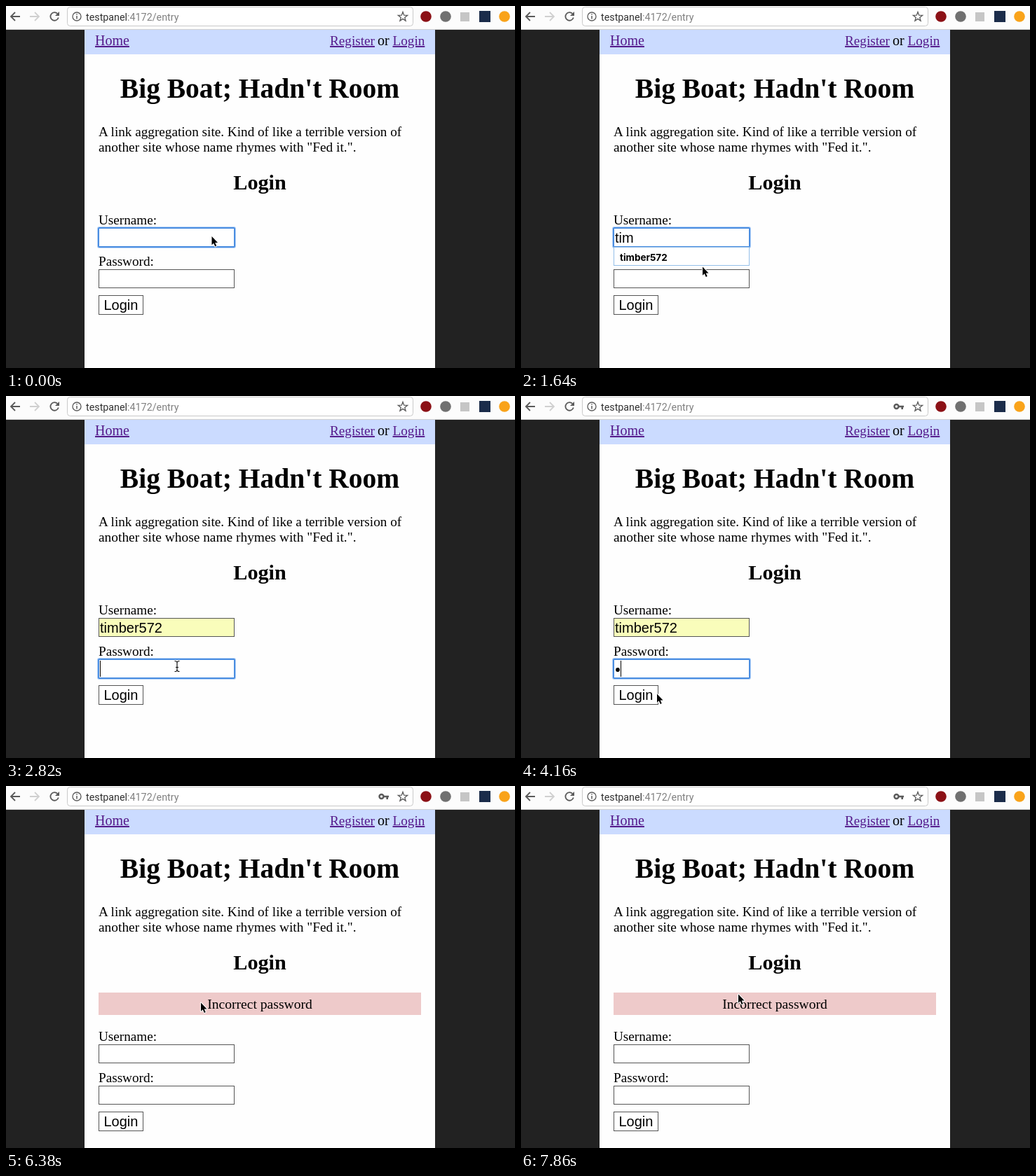
Animation, 726 px wide and 517 px high, one loop 8 s. Source, as an HTML page:

```html
<!DOCTYPE html>
<html lang="en">
<head>
<meta charset="utf-8">
<title>Login form</title>
<style>
  html, body { margin: 0; width: 100%; height: 100%; overflow: hidden; background: #222; }
  svg { display: block; }
  .serif { font: 19.2px "Liberation Serif", serif; }
  .field { font: 20px "Liberation Sans", sans-serif; }
  .link { fill: #551a8b; text-decoration: underline; }
  .bold { font-weight: bold; text-anchor: middle; }
  .box { fill: #fff; stroke: #555; }
  .icon { fill: none; stroke: #5a5a5a; stroke-width: 1.8; }
</style>
</head>
<body>
<svg width="726" height="517" viewBox="0 0 726 517">
  <rect width="726" height="517" fill="#222"/>
  <rect x="112" y="34" width="500" height="483" fill="#fefefe"/>
  <rect x="112" y="34" width="500" height="35" fill="#cbdbff"/>

  <!-- browser toolbar -->
  <rect width="726" height="34" fill="#fcfcfc"/>
  <path d="M0 33.5H726" stroke="#d0d0d0"/>
  <rect x="87.5" y="1.5" width="493" height="27" rx="4" fill="#fff" stroke="#c9c9c9"/>
  <path class="icon" d="M20 15H7.5M13 9L7 15L13 21"/>
  <path class="icon" d="M34 15H46.5M41 9L47 15L41 21" style="stroke:#d0d0d0"/>
  <g id="reload">
    <path class="icon" d="M73.5 11A5.8 5.8 0 1 0 74.8 16.5"/>
    <path d="M76 8V14H70Z" fill="#5a5a5a"/>
  </g>
  <path id="stop" class="icon" d="M64 10L74 20M74 10L64 20"/>
  <circle class="icon" cx="101" cy="15" r="6" style="stroke-width:1.3"/>
  <path d="M101 14V18.5M101 11V12.6" stroke="#5a5a5a" stroke-width="1.5"/>
  <text x="114" y="20.5" font-family="Roboto, sans-serif" font-size="14.3" fill="#303030">testpanel<tspan fill="#808080">:4172/entry</tspan></text>
  <g id="key">
    <circle class="icon" cx="535.5" cy="15" r="3" style="stroke-width:2.4"/>
    <path d="M538 15H546M543.7 15V19" fill="none" stroke="#5a5a5a" stroke-width="2.6"/>
  </g>
  <path id="star" class="icon" style="stroke-width:1.3"/>
  <circle cx="599" cy="15" r="7.8" fill="#8b1015"/>
  <circle cx="627" cy="15" r="7.8" fill="#707070"/>
  <rect x="648" y="9" width="13" height="13" fill="#c6c6c6"/>
  <rect x="675" y="7" width="16" height="16" fill="#1b2c4a"/>
  <circle cx="711" cy="15" r="7.8" fill="#f9a31a"/>

  <!-- page -->
  <g class="serif">
    <text class="link" x="127" y="56" style="font-size:20px">Home</text>
    <text class="link" x="462" y="56">Register</text>
    <text x="530" y="56" style="font-size:20px">or</text>
    <text class="link" x="551.5" y="56">Login</text>
    <text class="bold" x="362" y="131" style="font-size:39.5px">Big Boat; Hadn't Room</text>
    <text x="132" y="186">A link aggregation site. Kind of like a terrible version of</text>
    <text x="132" y="208" style="font-size:19.4px">another site whose name rhymes with "Fed it.".</text>
    <text class="bold" x="362" y="262" style="font-size:30.2px">Login</text>
    <g id="error">
      <rect x="132" y="295" width="460" height="32" fill="#eecaca"/>
      <text x="362" y="317.5" text-anchor="middle" style="font-size:19.6px">Incorrect password</text>
    </g>
  </g>

  <g id="form">
    <text class="serif" x="132" y="312">Username:</text>
    <text class="serif" x="132" y="371">Password:</text>
    <rect id="userBox" class="box" x="132.5" y="317.5" width="193" height="26"/>
    <rect class="box" x="132.5" y="376.5" width="193" height="26"/>
    <g id="ring" fill="none">
      <rect x="131" y="316" width="196" height="29" rx="2" stroke="#b5d3f8" stroke-width="2"/>
      <rect x="132" y="317" width="194" height="27" rx="1" stroke="#4a8de0" stroke-width="2"/>
    </g>
    <text id="user" class="field" x="134" y="338"></text>
    <circle id="bullet" cx="138" cy="391" r="2.9"/>
    <path id="caret" d="M0 378V401" stroke="#000"/>
    <rect class="box" x="132.5" y="413.5" width="63" height="27"/>
    <text class="field" x="139.5" y="434">Login</text>
  </g>

  <g id="popup">
    <rect id="option" x="132.5" y="344.5" width="193" height="26" stroke="#94bfe8"/>
    <text id="hint" x="141" y="363.5" font-family="Inter, sans-serif" font-weight="700" font-size="13.5"></text>
  </g>

  <path id="arrow" d="M0.5 1V13.2L3.2 10.7L5.3 15.4L7.2 14.6L5.2 10H9Z" stroke="#fff" stroke-width="2" stroke-linejoin="round" paint-order="stroke"/>
  <path id="beam" d="M-3.5 -7.5Q0 -7.5 0 -5Q0 -7.5 3.5 -7.5M0 -5V5M-3.5 7.5Q0 7.5 0 5Q0 7.5 3.5 7.5M-2 1.5H2" fill="none" stroke="#111" stroke-width="1.2"/>
</svg>
<script>
const LOOP = 8000;
const USER = 'timber572';
const $ = id => document.getElementById(id);
const show = (id, on) => $(id).style.display = on ? '' : 'none';

// Pointer poses: start time, x, y, shape. A pose without a shape is hidden.
const pointer = [
  [0, 293, 328, 'arrow'], [600, 0, 0],
  [1190, 290, 344, 'arrow'], [1340, 280, 372, 'arrow'], [1490, 268, 379, 'arrow'],
  [1640, 258.5, 371.5, 'arrow'], [1780, 249, 362, 'arrow'], [1930, 246, 359, 'arrow'],
  [2380, 246, 364, 'arrow'], [2530, 245, 381, 'beam'], [2680, 244, 386, 'beam'],
  [3420, 0, 0],
  [3710, 240, 390, 'beam'], [3860, 229, 398, 'beam'], [4010, 208, 415, 'arrow'],
  [4160, 193.5, 424.5, 'arrow'], [4300, 185, 428, 'arrow'], [4450, 181, 428.5, 'arrow'],
  [5640, 188, 415, 'arrow'], [5790, 220, 370, 'arrow'], [5930, 257, 325, 'arrow'],
  [6080, 273, 309, 'arrow'], [6380, 277.5, 308.5, 'arrow'], [6530, 320, 308, 'beam'],
  [6670, 365.5, 308, 'beam'], [7270, 440, 311, 'beam'], [7420, 525, 312, 'arrow'],
  [7720, 291, 313, 'beam'], [7860, 309.5, 296.5, 'arrow']
];

function typedCount(t) {
  if (t < 600) return 0;
  if (t < 740) return 1;
  if (t < 890) return 2;
  return t < 1780 ? 3 : USER.length;
}

function drawPointer(t) {
  const [, x, y, shape] = pointer.findLast(pose => pose[0] <= t);
  for (const id of ['arrow', 'beam']) show(id, id === shape);
  if (shape) $(shape).setAttribute('transform', `translate(${x} ${y})`);
}

function draw(t) {
  const failed = t >= 4740;
  const filled = t >= 1780 && !failed;
  const onPassword = t >= 2680;
  const hasBullet = t >= 3420 && !failed;

  show('error', failed);
  $('form').setAttribute('transform', `translate(0 ${failed ? 52 : 0})`);
  $('user').textContent = failed ? '' : USER.slice(0, typedCount(t));
  $('userBox').style.fill = filled ? '#f9fdbb' : '#fff';

  show('ring', !failed);
  $('ring').setAttribute('transform', `translate(0 ${onPassword ? 59 : 0})`);
  show('bullet', hasBullet);
  show('caret', onPassword && !failed);
  $('caret').setAttribute('transform', `translate(${hasBullet ? 142.5 : 134.5} 0)`);

  show('popup', t >= 600 && t < 2230);
  $('option').style.fill = filled ? '#cdcdcd' : '#fff';

  const loading = t >= 4600 && t < 4890;
  show('reload', !loading);
  show('stop', loading);
  show('key', t >= 3420);
  drawPointer(t);
}

const starPoints = Array.from({ length: 10 }, (_, i) => {
  const r = i % 2 ? 2.9 : 7, a = i * Math.PI / 5;
  return `${566 + r * Math.sin(a)} ${15.5 - r * Math.cos(a)}`;
});
$('star').setAttribute('d', `M${starPoints.join('L')}Z`);
$('hint').textContent = USER;

const start = performance.now();
function tick() {
  draw((performance.now() - start) % LOOP);
  requestAnimationFrame(tick);
}
tick();
</script>
</body>
</html>
```
